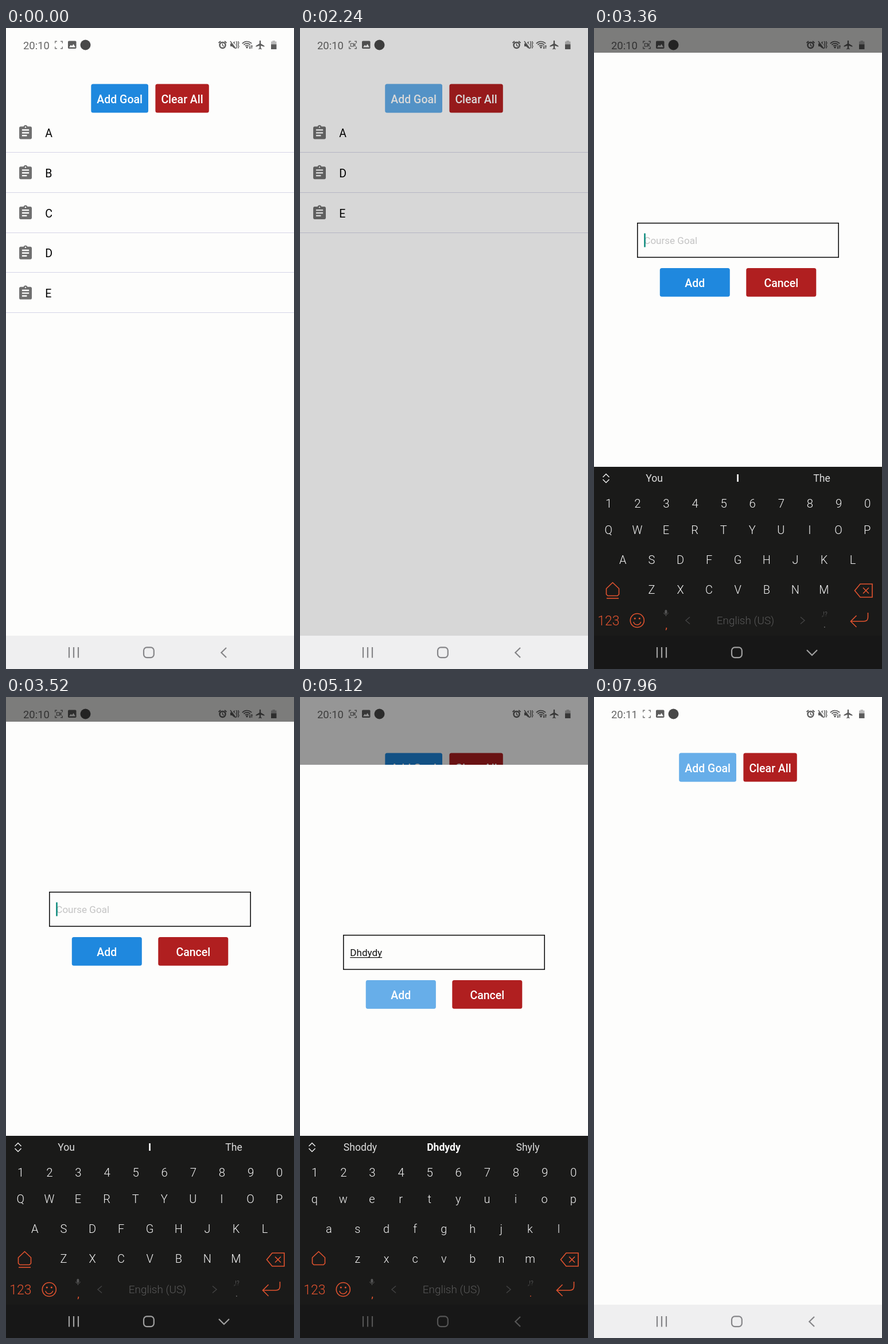
Animation of 502 by 1116 pixels, one loop 8 s. Source, as an HTML page with a canvas:

```html
<!DOCTYPE html>
<html lang="en">
<head>
<meta charset="utf-8">
<title>Goal list</title>
<style>
html, body { margin: 0; width: 100%; height: 100%; overflow: hidden; background: #fdfdfc; }
canvas { display: block; width: 502px; height: 1116px; }
</style>
</head>
<body>
<canvas id="stage" width="502" height="1116"></canvas>
<script>
const W = 502, H = 1116, LOOP = 8000;
const PAPER = '#fdfdfc', BLUE = '#1f88de', RED = '#b01f20', ORANGE = '#e2532f', INK = '#5c5c5c';
const NAV_Y = 1058, KEYS_Y = 764, ROW = 69.8, LIFT = 147;
const ctx = document.getElementById('stage').getContext('2d');

const clipboard = new Path2D('M19 3h-4.18C14.4 1.84 13.3 1 12 1c-1.3 0-2.4.84-2.82 2H5c-1.1 0-2 .9-2 2v14c0 1.1.9 2 2 2h14c1.1 0 2-.9 2-2V5c0-1.1-.9-2-2-2zm-7 0c.55 0 1 .45 1 1s-.45 1-1 1-1-.45-1-1 .45-1 1-1zm2 14H7v-2h7v2zm3-4H7v-2h10v2zm0-4H7V7h10v2z');
const plane = new Path2D('M21 16v-2l-8-5V3.5c0-.83-.67-1.5-1.5-1.5S10 2.67 10 3.5V9l-8 5v2l8-2.5V19l-2 1.5V22l3.5-1 3.5 1v-1.5L13 19v-5.5l8 2.5z');

// Button touches: start and release times
const addGoalTaps = [[1910, 2220], [7820, 8100]];
const clearTaps = [[6600, 6860]];
const addTaps = [[4790, 5240]];
const WORD = 'Dhdydy', TYPE_START = 3840, KEY_GAP = 90;
const hints = [['You', 'The'], ['Do', 'Did'], ['Dhabi', 'Dh'], ['Did', 'Dhd'],
  ['Daddy', 'Shy'], ['Shyly', 'Study'], ['Shoddy', 'Shyly']];

const clamp = v => Math.max(0, Math.min(1, v));
const span = (t, a, b) => clamp((t - a) / (b - a));
const easeOut = p => 1 - (1 - p) * (1 - p);

function text(s, x, y, size, color, { weight = 400, align = 'left' } = {}) {
  ctx.font = `${weight} ${size}px Roboto, sans-serif`;
  ctx.textAlign = align;
  ctx.fillStyle = color;
  ctx.fillText(s, x, y);
}

function rect(x, y, w, h, color) {
  ctx.fillStyle = color;
  ctx.fillRect(x, y, w, h);
}

function poly(points, close) {
  ctx.beginPath();
  points.forEach(([x, y]) => ctx.lineTo(x, y));
  if (close) ctx.closePath();
}

function line(points, color, width, close) {
  poly(points, close);
  ctx.strokeStyle = color;
  ctx.lineWidth = width;
  ctx.stroke();
}

function shape(points, color) {
  poly(points, true);
  ctx.fillStyle = color;
  ctx.fill();
}

function arc(x, y, r, a, b, color, width) {
  ctx.beginPath();
  ctx.arc(x, y, r, a, b);
  ctx.strokeStyle = color;
  ctx.lineWidth = width;
  ctx.stroke();
}

function disc(x, y, r, color) {
  ctx.beginPath();
  ctx.arc(x, y, r, 0, 7);
  ctx.fillStyle = color;
  ctx.fill();
}

function icon(path, x, y, scale, color) {
  ctx.save();
  ctx.translate(x, y);
  ctx.scale(scale, scale);
  ctx.fillStyle = color;
  ctx.fill(path, 'evenodd');
  ctx.restore();
}

function button(x, y, w, h, label, color, taps, t) {
  ctx.save();
  ctx.beginPath();
  ctx.roundRect(x, y, w, h, 3.5);
  ctx.fillStyle = color;
  ctx.fill();
  ctx.clip();
  text(label, x + w / 2, y + 33.2, 19.5, '#fff', { weight: 500, align: 'center' });
  for (const [down, up] of taps) {
    const fade = 1 - span(t, up, up + 260);
    if (t < down || !fade) continue;
    const p = easeOut(span(t, down, down + 150));
    const r = Math.hypot(w, h) / 2 * p;
    disc(x + w / 2 - 12 * (1 - p), y + h / 2 - 6 * (1 - p), r, `rgba(255,255,255,${0.32 * fade})`);
  }
  ctx.restore();
}

function statusBar(t) {
  text(t < 7640 ? '20:10' : '20:11', 30, 36.6, 18.4, '#666');

  // Recording marker
  for (const sx of [-1, 1]) for (const sy of [-1, 1]) {
    const x = 92 + sx * 6.3, y = 29.5 + sy * 6.3;
    line([[x - sx * 3.2, y], [x, y], [x, y - sy * 3.2]], '#777', 1.4);
  }
  if (t >= 131 && Math.floor((t - 131) / 499) % 2 === 0) {
    ctx.strokeStyle = '#777';
    ctx.lineWidth = 1.3;
    ctx.strokeRect(88.3, 27, 5, 5);
    line([[93.5, 29.5], [96, 27.4], [96, 31.6]], '#777', 1.2, true);
  }

  ctx.beginPath();
  ctx.roundRect(108, 22.5, 14.5, 13.5, 1.8);
  ctx.fillStyle = INK;
  ctx.fill();
  shape([[110, 33.5], [113, 29.5], [115, 31.6], [117.6, 28], [121, 33.5]], PAPER);
  disc(138.5, 29.5, 9, '#484848');

  // Alarm
  arc(377.5, 30, 5, 0, 7, INK, 2.4);
  line([[377.5, 27], [377.5, 30.3], [380, 31.8]], INK, 1.4);
  line([[370.5, 26], [374, 23]], INK, 1.9);
  line([[381, 23], [384.5, 26]], INK, 1.9);

  // Muted speaker with vibration
  shape([[391, 27], [394, 27], [398.5, 23], [398.5, 36], [394, 32], [391, 32]], INK);
  line([[392, 22.5], [401.5, 35.5]], PAPER, 3);
  line([[391, 23], [400.5, 36]], INK, 1.5);
  for (const x of [401.2, 404.4])
    line([[x, 23], [x + 1.5, 26], [x, 29], [x + 1.5, 32], [x, 35.5]], INK, 1.4);

  // Wi-Fi
  for (const r of [4.2, 7.6, 11]) arc(420, 34.5, r, -2.4, -0.75, INK, 1.7);
  disc(420, 33.8, 1.7, INK);
  line([[425.2, 30.5], [425.2, 35.8]], INK, 1.4);
  line([[428.4, 30.5], [428.4, 35.8]], INK, 1.4);
  shape([[423.3, 34], [427, 34], [425.2, 36.8]], INK);
  shape([[426.6, 32.3], [430.2, 32.3], [428.4, 29.5]], INK);

  icon(plane, 434, 20.2, 0.78, INK);

  rect(464.5, 22, 4.5, 2, '#bbb');
  rect(462, 23.5, 9.5, 5.5, '#bbb');
  rect(462, 28.5, 9.5, 8.5, INK);
}

function goals(t) {
  if (t >= 6880) return [];
  if (t >= 5080) return ['A', 'D', 'E', WORD];
  if (t >= 1560) return ['A', 'D', 'E'];
  return t >= 480 ? ['A', 'C', 'D', 'E'] : ['A', 'B', 'C', 'D', 'E'];
}

function home(t) {
  rect(0, 0, W, H, PAPER);
  statusBar(t);
  button(148.3, 97.5, 99.7, 50, 'Add Goal', BLUE, addGoalTaps, t);
  button(260.4, 97.5, 93.4, 50, 'Clear All', RED, clearTaps, t);
  const held = (t >= 40 && t < 480) || (t >= 1120 && t < 1560);
  goals(t).forEach((name, i) => {
    const y = i * ROW;
    ctx.globalAlpha = held && i === 1 ? 0.85 : 1;
    icon(clipboard, 19.4, 167.8 + y, 1.2185, '#6f6f6f');
    text(name, 68.2, 190 + y, 19.5, '#000');
    rect(0, Math.round(216 + y), W, 1, '#d5d4e6');
    ctx.globalAlpha = 1;
  });
}

function modal(t) {
  if (t < 2240 || t >= 5238) return;
  const enter = easeOut(span(t, 2360, 2480));
  const leave = span(t, 5080, 5238) ** 2;
  const drop = (1 - enter + leave) * H;
  const dim = t < 2360 ? 0.15 : (0.15 + 0.36 * enter) * (1 - leave ** 0.6 * 1);
  const shade = t > 5080 ? 0.51 * (1 - Math.sqrt(leave) ** 1.2) : dim;
  rect(0, 0, W, NAV_Y, `rgba(0,0,0,${shade})`);

  ctx.save();
  ctx.beginPath();
  ctx.rect(0, 0, W, NAV_Y);
  ctx.clip();
  ctx.translate(0, Math.round(drop));
  rect(0, 43, W, H, PAPER);
  if (t >= 3300) ctx.translate(0, -LIFT);
  ctx.strokeStyle = '#111';
  ctx.lineWidth = 1.6;
  ctx.strokeRect(75.8, 486.7, 350.4, 59.6);

  const typed = WORD.slice(0, typedCount(t));
  let end = 87.3;
  if (typed) {
    text(typed, end, 523, 17.06, '#111');
    const w = ctx.measureText(typed).width;
    rect(end, 525, w, 1.2, '#111');
    end += w;
  } else {
    text('Course Goal', end, 523, 17.06, '#c4c4c4');
  }
  if ((t >= 2640 && t < 3140) || (t >= 3300 && t < 4820))
    rect(end, 504.5, 2.4, 24, '#008577');

  button(114.8, 565, 122, 49.7, 'Add', BLUE, addTaps, t);
  button(265.3, 565, 122, 49.7, 'Cancel', RED, [], t);
  ctx.restore();
}

function typedCount(t) {
  return Math.max(0, Math.min(WORD.length, Math.floor((t - TYPE_START) / KEY_GAP) + 1));
}

function keyRow(keys, x, y, size) {
  [...keys].forEach((k, i) => text(k, x + i * 50.1, y, size, '#f2f2f2', { weight: 300, align: 'center' }));
}

function keyboard(t) {
  if (t < 3000 || t >= 5238) return;
  const slide = 1 - easeOut(span(t, 3000, 3280)) + span(t, 5125, 5238) ** 2;
  const n = typedCount(t), caps = n === 0;
  const mid = { align: 'center' };
  const set = s => caps ? s.toUpperCase() : s;

  ctx.save();
  ctx.beginPath();
  ctx.rect(0, 0, W, NAV_Y);
  ctx.clip();
  ctx.translate(0, slide * (NAV_Y - KEYS_Y));
  rect(0, KEYS_Y, W, H - KEYS_Y, '#1a1a19');

  line([[15.5, 782], [21, 776.5], [26.5, 782]], '#eee', 1.5);
  line([[15.5, 786], [21, 791.5], [26.5, 786]], '#eee', 1.5);
  text(hints[n][0], 105, 790, 17.6, '#ddd', mid);
  text(caps ? 'I' : WORD.slice(0, n), 250.5, 790, 17.6, '#fff', { weight: 700, align: 'center' });
  text(hints[n][1], 397, 790, 17.6, '#ddd', mid);

  keyRow('1234567890', 25.8, 834.5, 20.5);
  keyRow(set('qwertyuiop'), 25.3, 881, 20);
  keyRow(set('asdfghjkl'), 50.3, 933, 20);
  keyRow(set('zxcvbnm'), 100.4, 985, 20);

  // Shift
  line([[32.5, 965.5], [43.5, 976], [43.5, 986], [41, 988.5], [24, 988.5], [21.5, 986], [21.5, 976]], ORANGE, 1.6, true);
  if (caps) line([[22, 993], [43, 993]], ORANGE, 1.6);

  // Backspace
  line([[454.5, 979.5], [464, 968], [485, 968], [485, 991], [464, 991]], ORANGE, 1.6, true);
  line([[469, 974.5], [479, 984.5]], ORANGE, 1.6);
  line([[479, 974.5], [469, 984.5]], ORANGE, 1.6);

  text('123', 25.3, 1039.5, 23, ORANGE, { weight: 300, align: 'center' });
  arc(75.3, 1031.5, 12, 0, 7, ORANGE, 1.6);
  arc(75.3, 1032.5, 6.5, 0.2, Math.PI - 0.2, ORANGE, 1.5);
  disc(71.3, 1028, 1.6, ORANGE);
  disc(79.3, 1028, 1.6, ORANGE);

  // Bottom row, dimmed keys
  ctx.beginPath();
  ctx.roundRect(123.4, 1013, 4, 7, 2);
  ctx.fillStyle = '#555';
  ctx.fill();
  arc(125.4, 1017.5, 3.8, 0.1, Math.PI - 0.1, '#555', 1);
  line([[125.4, 1021], [125.4, 1024]], '#555', 1);
  text(',', 126, 1046, 19, ORANGE, mid);
  line([[167, 1025.5], [160, 1031.5], [167, 1037.5]], '#444', 1.4);
  line([[360, 1025.5], [367, 1031.5], [360, 1037.5]], '#444', 1.4);
  text('English (US)', 264, 1038, 18.9, '#595959', { weight: 300, align: 'center' });
  text(',!?', 402, 1024, 10, '#555', mid);
  text('.', 402, 1044, 17, caps ? '#777' : ORANGE, mid);

  // Enter
  ctx.beginPath();
  ctx.moveTo(477.5, 1018);
  ctx.lineTo(477.5, 1026);
  ctx.quadraticCurveTo(477.5, 1033, 470, 1033);
  ctx.lineTo(448, 1033);
  ctx.strokeStyle = ORANGE;
  ctx.lineWidth = 1.6;
  ctx.stroke();
  line([[457.5, 1023], [447.5, 1033], [457.5, 1043]], ORANGE, 1.6);
  ctx.restore();
}

function navBar(t) {
  const dark = t >= 3000 && t < 5160, closing = t >= 5100;
  const color = !dark ? '#858588' : closing ? '#555' : '#a0a0a0';
  rect(0, NAV_Y, W, H - NAV_Y, dark ? '#171717' : '#efeff0');
  for (const x of [110, 118, 126]) line([[x, 1078], [x, 1096.5]], color, 2.2);
  ctx.beginPath();
  ctx.roundRect(240, 1078.3, 17.8, 17.8, 5.5);
  ctx.lineWidth = 2.2;
  ctx.stroke();
  line(dark && !closing
    ? [[371, 1083], [380, 1092], [389, 1083]]
    : [[384, 1079], [375.3, 1087.5], [384, 1096]], color, 2.2);
}

function draw() {
  const t = performance.now() % LOOP;
  home(t);
  modal(t);
  keyboard(t);
  navBar(t);
  requestAnimationFrame(draw);
}
draw();
</script>
</body>
</html>
```
